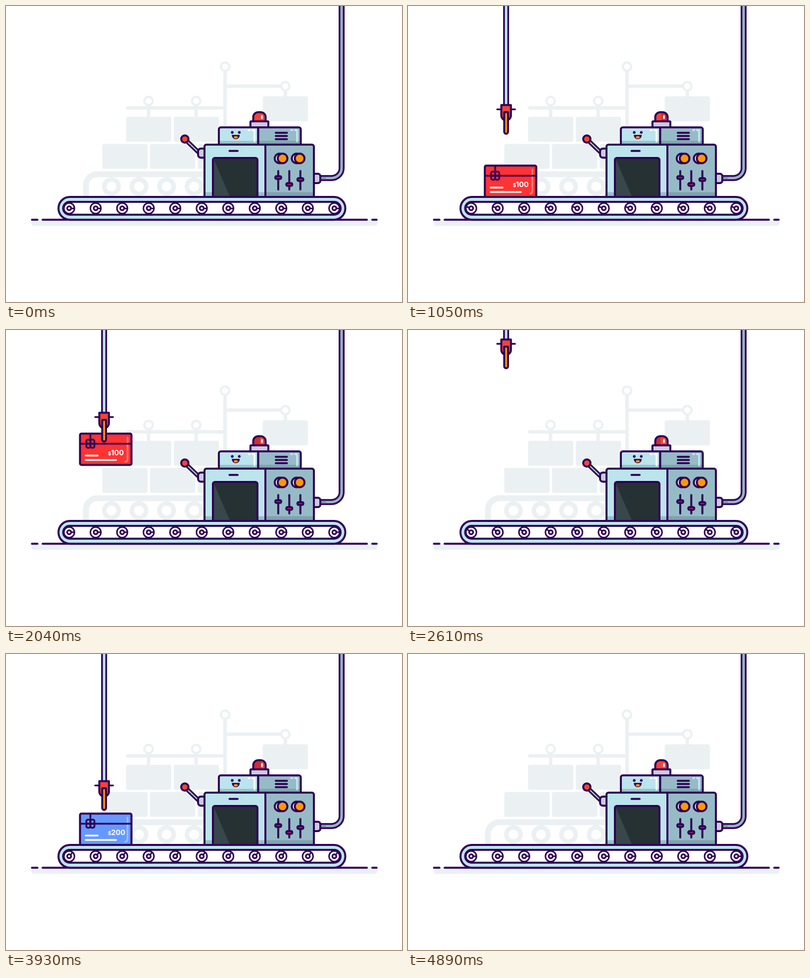
These frames come from a looping animation (800x600 px, 4920 ms). An HTML page with a canvas:

```html
<!DOCTYPE html>
<html lang="en">
<head>
<meta charset="utf-8">
<title>Gift card machine</title>
<style>
html, body { margin: 0; width: 100%; height: 100%; overflow: hidden; background: #fff; }
canvas { display: block; width: 800px; height: 600px; }
</style>
</head>
<body>
<canvas id="stage" width="800" height="600"></canvas>
<script>
const ctx = document.getElementById('stage').getContext('2d');
const LOOP = 4920, SECOND = 2510;
const INK = '#2f0055', PALE = '#ebf1f3', SKY = '#bce4ed', STEEL = '#96bbc7';
const SKY_FOOT = '#96bfcb', STEEL_FOOT = '#7fa2ae';
const LILAC = '#cbcbdf', RED = '#f44336', ORANGE = '#ff9800';
const GRIP = 1560, REST = 206, REACH = 84;

// Progress 0..1 of a move that starts at `from` and takes `span` ms
const part = (t, from, span) => Math.max(0, Math.min(1, (t - from) / span));
const easeOut = (u, power) => 1 - (1 - u) ** power;

const cardX = p => 410 - 261 * easeOut(part(p, 100, 1320), 3);
const wheelTurn = p => 4 * 2 * Math.PI * easeOut(part(p, 0, 2400), 3.8);

function clawY(p) {
  const enter = easeOut(part(p, 0, 570), 2);
  const drop = part(p, 817, 674) ** 3;
  const lift = part(p, GRIP, 750) ** 3;
  return REST - 263 * (1 - enter) + REACH * drop - 430 * lift;
}

function paint(fill, stroke, width = 4) {
  if (fill) { ctx.fillStyle = fill; ctx.fill(); }
  if (stroke) { ctx.strokeStyle = stroke; ctx.lineWidth = width; ctx.stroke(); }
}
function box(x, y, w, h, r, fill, stroke, width) {
  ctx.beginPath();
  ctx.roundRect(x, y, w, h, r);
  paint(fill, stroke, width);
}
function disc(x, y, r, fill, stroke, width) {
  ctx.beginPath();
  ctx.arc(x, y, r, 0, Math.PI * 2);
  paint(fill, stroke, width);
}
function line(color, width, ...pts) {
  ctx.beginPath();
  for (let i = 0; i < pts.length; i += 2) ctx.lineTo(pts[i], pts[i + 1]);
  paint(null, color, width);
}
// Draws a two-tone tube along the path that `trace` builds
function tube(core, trace) {
  ctx.lineCap = 'butt';
  ctx.beginPath();
  trace();
  paint(null, INK, 12);
  paint(null, core, 5);
  ctx.lineCap = 'round';
}

const crate = (x, y) => box(x, y, 91.5, 50.8, 4, PALE);

function hook(x, y) {
  line(PALE, 7, x, y + 9, x, y + 30);
  disc(x, y, 8.5, '#fff', PALE, 4.5);
}

function backdrop() {
  ctx.lineCap = 'butt';
  ctx.beginPath();
  ctx.moveTo(161.5, 387);
  ctx.arcTo(161.5, 341, 185, 341, 23);
  ctx.lineTo(402, 341);
  paint(null, PALE, 12);
  ctx.lineCap = 'round';
  for (let i = 0; i < 4; i++) disc(213 + 55.7 * i, 366, 14.5, '#fff', PALE, 9);
  for (let i = 0; i < 3; i++) crate(194.5 + 96.4 * i, 279.5);
  line(PALE, 7, 246, 206.5, 442, 206.5);
  line(PALE, 7, 442.5, 134, 442.5, 250);
  line(PALE, 7, 442.5, 162.5, 555, 162.5);
  for (let i = 0; i < 2; i++) {
    crate(242.5 + 96.4 * i, 224.5);
    hook(288 + 96.2 * i, 192.5);
  }
  crate(518.5, 183);
  hook(564.3, 162.5);
  disc(442.5, 123, 8.5, '#fff', PALE, 4.5);
}

function ground() {
  box(51.5, 433, 698.5, 12.8, [0, 0, 5, 5], PALE);
  line(INK, 4, 52.5, 433.2, 63.5, 433.2);
  line(INK, 4, 74, 433.2, 729, 433.2);
  line(INK, 4, 740, 433.2, 748.7, 433.2);
}

function wheel(x, y, turn) {
  const c = Math.cos(turn), s = Math.sin(turn);
  disc(x, y, 10.7, '#fff', INK, 3);
  line(INK, 3, x + c * 5, y + s * 5, x + c * 10, y + s * 10);
  disc(x, y, 4, '#fff', INK, 3.4);
}

function belt(turn) {
  box(106, 387, 579.5, 46.2, 23, SKY, INK);
  box(115.5, 397, 560.5, 26, 13, '#fff', INK);
  for (let i = 0; i < 11; i++) wheel(127.6 + 53.57 * i, 410, turn);
}

function card(x, y, fill, amount) {
  ctx.save();
  ctx.translate(x, y);
  box(0.5, 0, 104, 63.5, 3, fill, INK);
  ctx.beginPath();
  ctx.moveTo(96.5, 8);
  ctx.lineTo(96.5, 51);
  ctx.quadraticCurveTo(96.5, 56.5, 92, 57);
  paint(null, 'rgba(255,255,255,.35)', 3.6);
  line(INK, 3.5, 1, 20.5, 104, 20.5);
  line(INK, 3.5, 21.5, 1, 21.5, 20);
  for (let i = 0; i < 4; i++)
    box(13.3 + 8.2 * (i % 2), 12.3 + 8.2 * (i >> 1), 8.2, 8.2, 3.2, null, INK, 3.5);
  line('#fff', 3.4, 12, 44.5, 36.5, 44.5);
  line('#fff', 3.4, 12, 53.5, 73.5, 53.5);
  ctx.fillStyle = '#fff';
  ctx.font = '700 10px Inter, sans-serif';
  ctx.fillText('$', 57, 43.5);
  ctx.font = '700 14.5px Inter, sans-serif';
  ctx.fillText(amount, 63.3, 43.5);
  ctx.restore();
}

function pipe() {
  tube('#96b4c5', () => {
    ctx.moveTo(678, -5);
    ctx.arcTo(678, 348.7, 658, 348.7, 20);
    ctx.lineTo(634, 348.7);
  });
  line('#7d95aa', 5, 634, 348.7, 644, 348.7);
  box(621, 340, 14, 19, [0, 5, 5, 0], LILAC, INK);
}

function lever() {
  line(INK, 9, 364, 272.5, 389, 296.5);
  line(LILAC, 2.4, 364, 272.5, 389, 296.5);
  disc(361.3, 269.6, 7.4, RED, INK);
  box(388, 289, 14, 18.5, [6, 0, 0, 6], LILAC, INK);
}

function shine(x, color) {
  line(color, 3.4, x, 251.7, x + 2.5, 251.7);
  line(color, 3.4, x + 7.5, 251.7, x + 12, 251.7, x + 12, 274.5);
}

function beacon(t) {
  box(499.5, 215.2, 25, 22, [10, 10, 0, 0], RED);
  ctx.save();
  ctx.clip();
  // Shadow band of the turning lamp
  ctx.fillStyle = 'rgba(120,0,50,.32)';
  ctx.fillRect(485 + 38 * (t % 615) / 615, 212, 16, 26);
  ctx.restore();
  box(499.5, 215.2, 25, 22, [10, 10, 0, 0], null, INK);
  line('#fff', 3.6, 517, 223, 517, 227.5);
  box(493.8, 233.7, 36.2, 12.3, 1.5, LILAC, INK);
}

function panel(x, y, w, h, r, fill, foot, footH) {
  box(x, y, w, h, r, fill);
  box(x, y + h - footH, w, footH, 0, foot);
  box(x, y, w, h, r, null, INK);
}

function face(x, y) {
  for (const side of [-1, 1]) disc(x + 7.1 * side, y, 2.7, INK);
  ctx.beginPath();
  ctx.moveTo(x - 8, y + 5);
  ctx.lineTo(x + 8, y + 5);
  ctx.bezierCurveTo(x + 8, y + 16.6, x - 8, y + 16.6, x - 8, y + 5);
  paint(INK);
  ctx.beginPath();
  ctx.ellipse(x, y + 10, 4, 2.4, 0, 0, Math.PI * 2);
  paint(ORANGE);
}

function windowPane() {
  box(418, 308, 90, 80, [4, 4, 0, 0], '#263133');
  ctx.beginPath();
  ctx.moveTo(419, 309);
  ctx.lineTo(452.5, 387);
  ctx.lineTo(419, 387);
  paint('#37474b');
  box(418, 308, 90, 80, [4, 4, 0, 0], null, INK);
}

function knob(x) {
  disc(x - 6, 309, 9.8, '#fff', INK);
  disc(x, 309, 9.8, ORANGE, INK);
}

function slider(x, y) {
  line(INK, 4, x, 334.5, x, 372);
  box(x - 6, y - 2.8, 12, 5.6, 2.5, '#bd3350', INK);
}

function machine(t) {
  beacon(t);
  panel(430, 246, 79.5, 35, [4, 0, 0, 0], SKY, SKY_FOOT, 7.5);
  panel(509.5, 246, 86, 35, [0, 4, 0, 0], STEEL, STEEL_FOOT, 7.5);
  shine(490, '#fff');
  shine(576, '#c7e9f1');
  for (let i = 0; i < 3; i++) line(INK, 4, 545, 257 + 6.5 * i, 567.5, 257 + 6.5 * i);
  face(464.2, 256.2);

  panel(401, 281, 123, 106, [4, 0, 0, 0], SKY, SKY_FOOT, 9.5);
  panel(524, 281, 98, 106, [0, 4, 0, 0], STEEL, STEEL_FOOT, 9.5);
  line(INK, 4, 451.5, 293.7, 468, 293.7);
  windowPane();
  knob(558.7);
  knob(593.2);
  slider(550, 347.8);
  slider(572.3, 361.7);
  slider(594.7, 351.8);
}

function claw(y) {
  const x = 198.2;
  tube(SKY, () => {
    ctx.moveTo(x, -250);
    ctx.lineTo(x, y - 9);
  });
  line(INK, 3.6, x - 18, y, x + 18, y);
  box(x - 9.7, y - 8.7, 19.4, 30.5, [0, 0, 9, 9], RED, INK);
  box(x - 3.8, y + 5.8, 7.6, 43.7, [0, 0, 3.8, 3.8], ORANGE, INK);
}

function draw(t) {
  const second = t >= SECOND, p = second ? t - SECOND : t, y = clawY(p);
  const cardY = 323.5 + (p > GRIP ? y - REST - REACH : 0);
  ctx.fillStyle = '#fff';
  ctx.fillRect(0, 0, 800, 600);
  ctx.lineCap = ctx.lineJoin = 'round';
  backdrop();
  ground();
  card(cardX(p), cardY, second ? '#6699ff' : '#ff3333', second ? '200' : '100');
  pipe();
  lever();
  machine(t);
  belt(wheelTurn(p));
  claw(y);
}

const start = performance.now();
function frame() {
  draw((performance.now() - start) % LOOP);
  requestAnimationFrame(frame);
}
frame();
</script>
</body>
</html>
```
